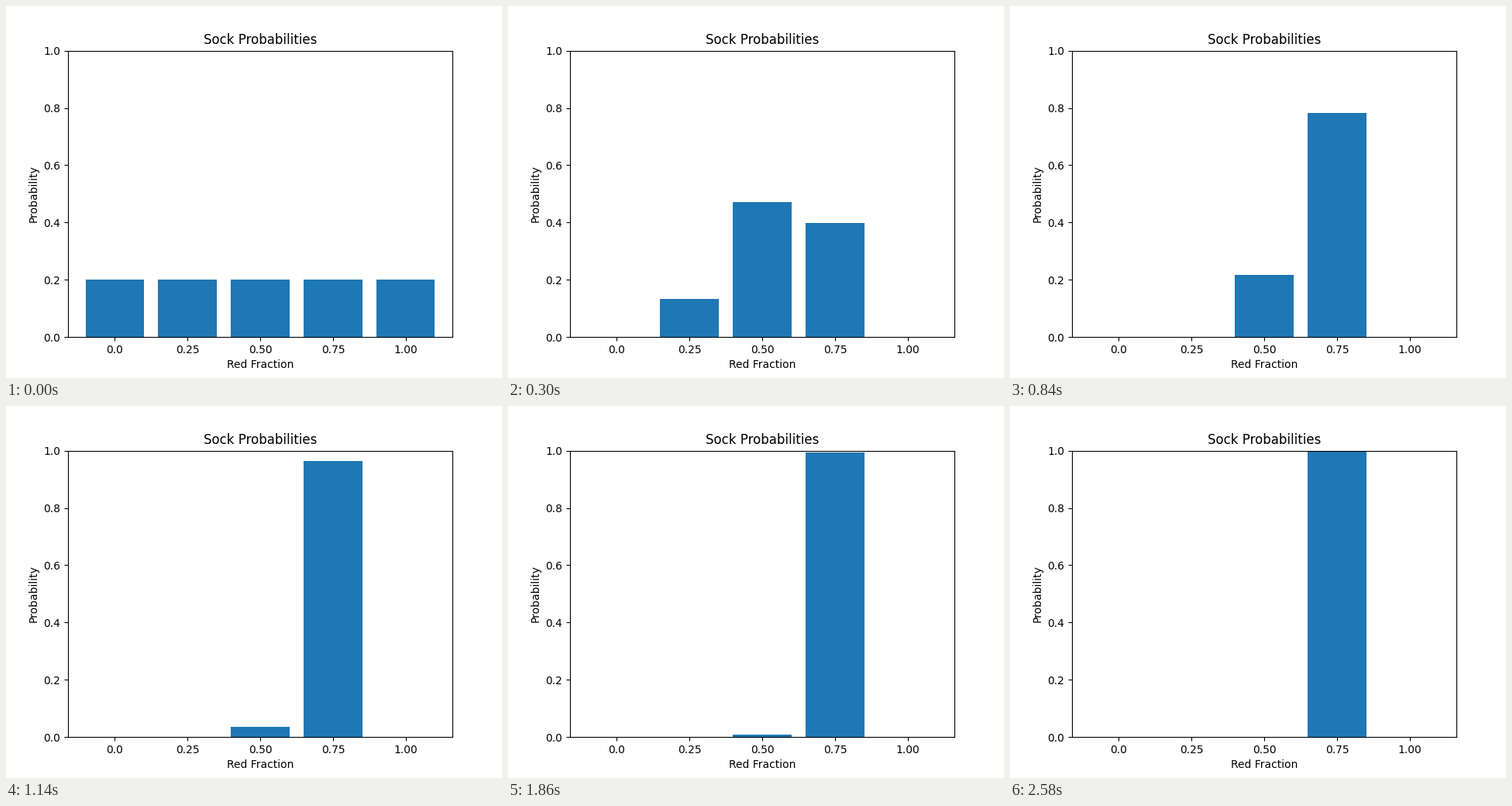
These frames come from a looping animation (640x480 px, 3600 ms). A matplotlib script:

```python
import matplotlib.pyplot as plt
import numpy as np
from matplotlib.animation import FuncAnimation

FRAMES, INTERVAL = 60, 60
DRAWS = 43
LABELS = ["0.0", "0.25", "0.50", "0.75", "1.00"]
RED_FRACTIONS = np.linspace(0, 1, 5)
OTHER_DRAWS = np.array([2, 5, 11, 13, 21, 26, 29, 36, 37, 41])  # draws that were not red


def posterior(draws):
    """Belief in each red fraction after the given number of draws."""
    others = np.sum(OTHER_DRAWS <= draws)
    likelihood = RED_FRACTIONS ** (draws - others) * (1 - RED_FRACTIONS) ** others
    return likelihood / likelihood.sum()


fig, ax = plt.subplots(figsize=(6.4, 4.8), dpi=100)
bars = ax.bar(LABELS, posterior(0))
ax.set_ylim(0, 1)
ax.set_title("Sock Probabilities")
ax.set_xlabel("Red Fraction")
ax.set_ylabel("Probability")


def update(frame):
    for bar, height in zip(bars, posterior(min(frame, DRAWS))):
        bar.set_height(height)
    return bars


anim = FuncAnimation(fig, update, frames=FRAMES, interval=INTERVAL, repeat=True, repeat_delay=0)
plt.show()
```
